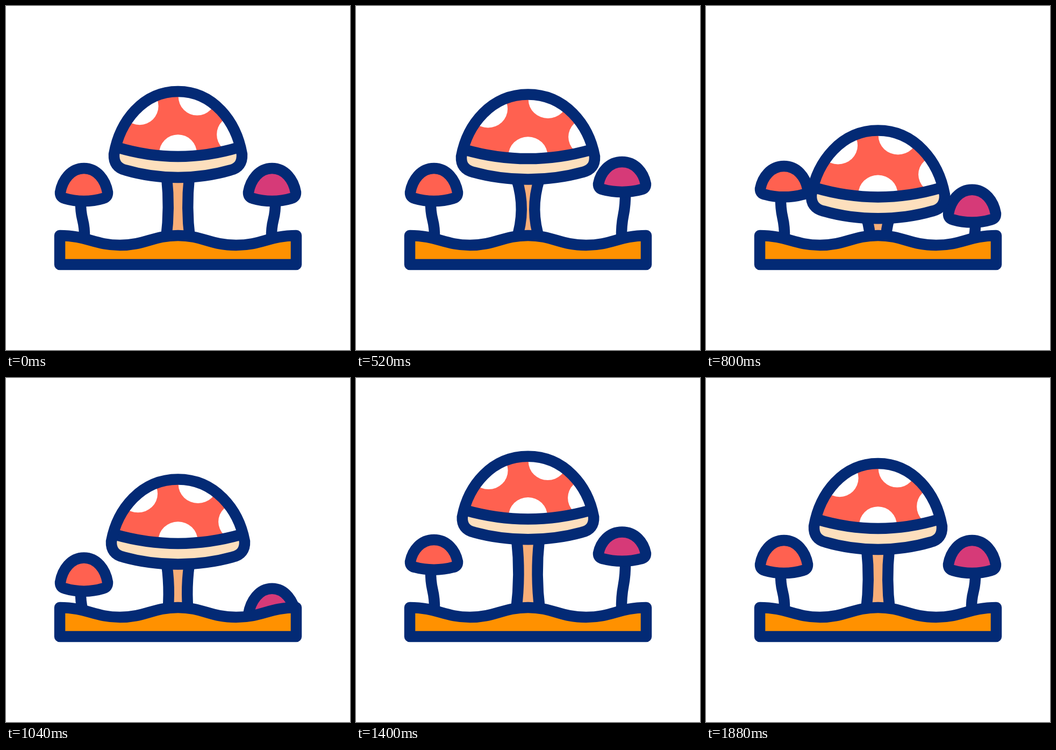
Animation of 640 by 640 pixels, one loop 2 s. Source, as an HTML page with a canvas:

```html
<!DOCTYPE html>
<html>
<head>
<meta charset="utf-8">
<style>
html, body { margin: 0; height: 100%; overflow: hidden; background: #fff; }
canvas { display: block; width: 100vw; height: 100vh; }
</style>
</head>
<body>
<canvas id="stage" width="640" height="640"></canvas>
<script>
const ctx = document.getElementById('stage').getContext('2d');
const NAVY = '#032a75', RED = '#ff6150', PINK = '#d63a78', CREAM = '#fddfbd',
      TAN = '#f8ae78', ORANGE = '#ff9100';
const LOOP = 2000, STEP = 40;
const GROUND = new Path2D('M100 427C150 427 165 445 212 445S274 427 320 427' +
  'S380 445 428 445S490 427 540 427V481H100Z');

// Each mushroom rises a little, dips, overshoots and settles.
const big = { cx: 320, w: 119, apex: 159, base: 319,
              times: [200, 420, 820, 1280, 1580], shifts: [0, -10, 77, -29, 0] };
const left = { cx: 145, w: 44, apex: 302, base: 363, side: 1, color: RED,
               times: [520, 700, 1140, 1560, 1880], shifts: [0, -15, 41, -29, 0] };
const right = { cx: 495, w: 44, apex: 302, base: 363, side: -1, color: PINK,
                times: [200, 520, 1080, 1340, 1880], shifts: [0, -17, 96, -23, 0] };

function ramp(t, from, to) {
  const u = Math.min(1, Math.max(0, (t - from) / (to - from)));
  return u * u * (3 - 2 * u);
}

const bob = (t, times, shifts) => shifts.slice(1).reduce((sum, s, i) =>
  sum + (s - shifts[i]) * ramp(t, times[i], times[i + 1]), 0);

// The apex travels less than the base, so the cap squashes when it is high.
function pose({ cx, apex, base, w, times, shifts }, t, widen = 0) {
  const drop = bob(t, times, shifts);
  const top = apex + bob(t, times, shifts.map(s => s * (s < 0 ? .7 : .95)));
  const bottom = base + drop;
  return {
    bottom,
    foot: Math.min(476, 432 + Math.max(0, drop)),
    at: (u, v) => [cx + u * (w + widen), top + v * (bottom - top)]
  };
}

function capPath(at) {
  const p = new Path2D();
  p.moveTo(...at(0, 0));
  p.bezierCurveTo(...at(-.55, 0), ...at(-.91, .35), ...at(-1, .73));
  p.quadraticCurveTo(...at(-1.01, .88), ...at(-.82, .915));
  p.quadraticCurveTo(...at(-.43, 1), ...at(0, 1));
  p.quadraticCurveTo(...at(.43, 1), ...at(.82, .915));
  p.quadraticCurveTo(...at(1.01, .88), ...at(1, .73));
  p.bezierCurveTo(...at(.91, .35), ...at(.55, 0), ...at(0, 0));
  p.closePath();
  return p;
}

function paint(path, fill) {
  if (fill) { ctx.fillStyle = fill; ctx.fill(path); }
  ctx.stroke(path);
}

function smallMushroom(mushroom, t) {
  const { cx, side, color } = mushroom;
  const { bottom, foot, at } = pose(mushroom, t), h = foot - bottom;
  const stem = new Path2D();
  stem.moveTo(cx - 6 * side, bottom);
  stem.bezierCurveTo(cx - 7 * side, bottom + h * .55,
                     cx + 2 * side, bottom + h * .45, cx + side, foot);
  paint(stem);
  paint(capPath(at), color);
}

function bigMushroom(t) {
  const { cx, w } = big;
  const settle = ramp(t, 1280, 1580), swell = ramp(t, 200, 420) - settle;
  const pinch = 6 * swell - 5 * (ramp(t, 520, 1040) - settle);
  const { bottom, foot, at } = pose(big, t, 5 * swell);
  const mid = (bottom + foot) / 2, waist = 15 - 2 * pinch;

  const stem = new Path2D();
  stem.moveTo(cx - 21, bottom);
  stem.quadraticCurveTo(cx - waist, mid, cx - 22, foot);
  stem.lineTo(cx + 22, foot);
  stem.quadraticCurveTo(cx + waist, mid, cx + 21, bottom);
  paint(stem, TAN);

  const cap = capPath(at), rim = new Path2D();
  rim.moveTo(...at(-.95, .65));
  rim.quadraticCurveTo(...at(0, .8625), ...at(.95, .65));
  const under = new Path2D(rim);
  under.lineTo(...at(1.2, 1.1));
  under.lineTo(...at(-1.2, 1.1));

  ctx.save();
  ctx.clip(cap);
  ctx.fillStyle = RED;
  ctx.fill(cap);
  ctx.fillStyle = '#fff';
  for (const [u, v] of [[-.6, .17], [.3, .06], [.9, .5], [0, .72]]) {
    ctx.beginPath();
    ctx.ellipse(...at(u, v), 35 * (1 + 5 * swell / w), 35, 0, 0, 7);
    ctx.fill();
  }
  ctx.fillStyle = CREAM;
  ctx.fill(under);
  ctx.restore();
  paint(rim);
  paint(cap);
}

function draw(now) {
  const t = Math.floor(now % LOOP / STEP) * STEP;
  ctx.fillStyle = '#fff';
  ctx.fillRect(0, 0, 640, 640);
  ctx.strokeStyle = NAVY;
  ctx.lineWidth = 20.5;
  ctx.lineJoin = 'round';
  smallMushroom(left, t);
  smallMushroom(right, t);
  bigMushroom(t);
  paint(GROUND, ORANGE);
  requestAnimationFrame(() => draw(performance.now()));
}
draw(0);
</script>
</body>
</html>
```
